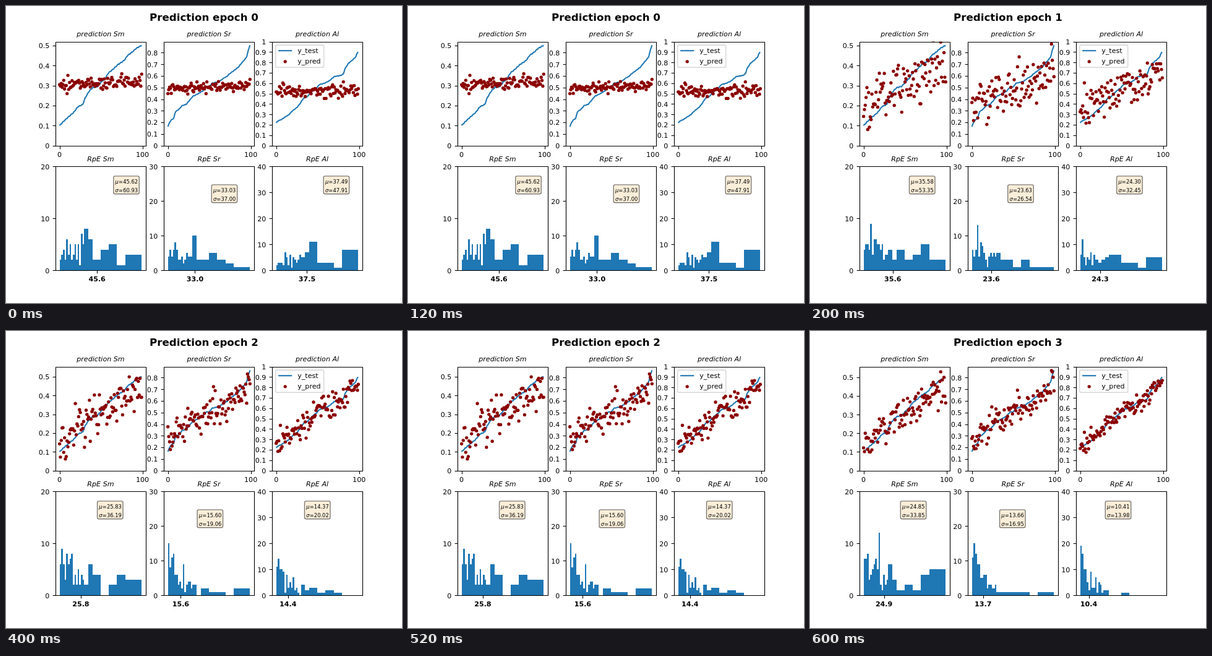
Animation of 640x480 px, one loop 0.8 s. Source, as an HTML page with a canvas:

```html
<!DOCTYPE html>
<html lang="en">
<head>
<meta charset="utf-8">
<title>Prediction epochs</title>
<style>
  html, body { margin: 0; width: 100%; height: 100%; overflow: hidden; background: #fff; }
  canvas { display: block; }
</style>
</head>
<body>
<canvas id="stage" width="640" height="480"></canvas>
<script>
const ctx = document.getElementById('stage').getContext('2d');
const PT = 100 / 72;
const BLUE = '#1f77b4', DARK_RED = '#8b0000';
const STEP = 200, EPOCHS = 4, COUNT = 100;
const AX_W = 145.88, AX_H = 168, COL = 175.06, LEFT = 80;
const TOP_Y = 57.6, LOW_Y = 259.2, PAD = AX_W / 22, SPAN = AX_W - 2 * PAD;

// Histogram bin edges in percent: fine at first, then coarser.
const EDGES = [...Array(16).keys()].map(i => i * 2).concat(35, 40, 50, 60, 70, 80, 100);

const panels = [
  {
    name: 'Sm', seed: 11, mid: 0.315, yMax: [0.52, 0.52, 0.554, 0.558], lowMax: 20, noteY: 15,
    slope: [0.03, 0.48, 0.68, 0.74], sd: [0.017, 0.066, 0.052, 0.046],
    mu: [45.62, 35.58, 25.83, 24.85], sigma: [60.93, 53.35, 36.19, 33.85],
    curve: [[0, .1], [4, .118], [10, .141], [17, .166], [22, .194], [28, .206], [31, .24], [36, .274],
      [40, .29], [46, .296], [51, .321], [55, .336], [59, .364], [64, .38], [70, .404], [77, .423],
      [79, .432], [82, .451], [88, .469], [92, .485], [99, .502]],
    bars: [
      [2, 3, 4, 2, 6, 3, 5, 2, 3, 5, 2, 5, 1, 7, 5, 8, 6, 2, 4, 5, 1, 3],
      [4, 5, 5, 4, 9, 3, 6, 6, 5, 5, 4, 5, 2, 3, 3, 4, 2, 4, 2, 3, 5, 2],
      [6, 9, 6, 3, 8, 6, 7, 8, 2, 4, 2, 5, 2, 4, 3, 2, 6, 4, 0, 2, 4, 3],
      [7, 7, 8, 3, 4, 5, 6, 7, 5, 12, 2, 1, 4, 2, 3, 6, 3, 1, 2, 1, 4, 5]
    ]
  },
  {
    name: 'Sr', seed: 29, mid: 0.505, yMax: [0.895, 0.895, 0.895, 0.895], lowMax: 30, noteY: 20,
    slope: [0.05, 0.5, 0.78, 0.82], sd: [0.022, 0.088, 0.066, 0.06],
    mu: [33.03, 23.63, 15.60, 13.66], sigma: [37.00, 26.54, 19.06, 16.95],
    curve: [[0, .163], [2, .2], [4, .22], [7, .235], [9, .29], [14, .317], [17, .344], [22, .355],
      [27, .397], [30, .424], [36, .445], [42, .47], [46, .504], [50, .506], [53, .536], [62, .552],
      [68, .584], [71, .594], [74, .616], [80, .648], [85, .675], [89, .712], [93, .744], [95, .765],
      [97, .82], [99, .866]],
    bars: [
      [4, 6, 4, 6, 8, 6, 3, 3, 4, 2, 3, 5, 4, 4, 4, 10, 3, 3, 5, 3, 2, 1],
      [6, 4, 6, 13, 4, 8, 7, 5, 3, 1, 4, 5, 4, 5, 4, 5, 3, 3, 1, 3, 1, 1],
      [15, 8, 11, 12, 6, 6, 3, 4, 2, 9, 1, 3, 4, 4, 2, 3, 0, 2, 1, 1, 0, 2],
      [11, 15, 12, 9, 9, 5, 5, 6, 6, 2, 3, 3, 2, 2, 3, 1, 1, 1, 1, 1, 0, 1]
    ]
  },
  {
    name: 'Al', seed: 47, mid: 0.525, yMax: [1, 1, 1, 1], lowMax: 40, noteY: 30,
    slope: [0.03, 0.55, 0.85, 0.93], sd: [0.03, 0.1, 0.068, 0.05],
    mu: [37.49, 24.30, 14.37, 10.41], sigma: [47.91, 32.45, 20.02, 13.98],
    curve: [[0, .218], [2, .236], [7, .254], [11, .277], [15, .295], [19, .33], [25, .367], [28, .396],
      [31, .432], [33, .456], [37, .468], [41, .504], [45, .533], [49, .557], [52, .587], [58, .599],
      [64, .623], [70, .664], [78, .675], [81, .69], [83, .74], [87, .79], [93, .83], [96, .855],
      [98, .896], [99, .9]],
    bars: [
      [2, 3, 3, 3, 2, 7, 5, 2, 6, 1, 5, 4, 3, 4, 6, 5, 7, 11, 3, 3, 1, 8],
      [6, 12, 5, 2, 5, 4, 7, 2, 6, 4, 4, 3, 3, 4, 4, 5, 6, 6, 3, 3, 1, 5],
      [11, 14, 10, 10, 9, 1, 8, 3, 5, 3, 7, 2, 3, 1, 0, 4, 2, 3, 1, 2, 1, 0],
      [19, 16, 10, 10, 5, 2, 9, 3, 3, 7, 1, 5, 4, 1, 2, 2, 0, 0, 1, 0, 0, 0]
    ]
  }
];

function seeded(seed) {
  let s = seed * 7919;
  return () => (s = (s * 16807) % 2147483647) / 2147483647;
}

// Linear interpolation with a faint stair, as in sorted samples.
function sample(curve, i) {
  let k = 1;
  while (curve[k][0] < i) k++;
  const [x0, y0] = curve[k - 1], [x1, y1] = curve[k];
  return y0 + (y1 - y0) * (i - x0) / (x1 - x0) + 0.002 * Math.sin(i * 1.9);
}

function prepare(p) {
  const rnd = seeded(p.seed);
  const bell = () => (rnd() + rnd() + rnd() + rnd() - 2) * 1.73;
  const indices = [...Array(COUNT).keys()];
  p.test = indices.map(i => sample(p.curve, i));
  const shared = indices.map(bell);
  p.pred = p.slope.map((slope, e) => p.test.map((y, i) => {
    const noise = e ? 0.87 * shared[i] + 0.5 * bell() : bell();
    return p.mid + slope * (y - p.mid) + p.sd[e] * noise;
  }));
}
panels.forEach(prepare);

const snap = v => Math.floor(v + 0.5) + 0.5;

function text(str, x, y, { size = 8, style = '', align = 'center' } = {}) {
  ctx.font = `${style} ${size * PT}px "DejaVu Sans", sans-serif`;
  ctx.textAlign = align;
  ctx.fillStyle = '#000';
  ctx.fillText(str, x, y);
}

function path(points, color, width) {
  ctx.beginPath();
  points.forEach(([x, y]) => ctx.lineTo(x, y));
  ctx.strokeStyle = color;
  ctx.lineWidth = width;
  ctx.stroke();
}

function dot(x, y) {
  ctx.beginPath();
  ctx.arc(x, y, 2.65, 0, 7);
  ctx.fillStyle = DARK_RED;
  ctx.fill();
}

function roundBox(x, y, w, h, fill, edge) {
  ctx.beginPath();
  ctx.roundRect(x, y, w, h, 2.5);
  ctx.fillStyle = fill;
  ctx.fill();
  ctx.strokeStyle = edge;
  ctx.lineWidth = PT;
  ctx.stroke();
}

function frame(x, y, title) {
  const l = snap(x), t = snap(y);
  ctx.strokeStyle = '#000';
  ctx.lineWidth = 0.8 * PT;
  ctx.strokeRect(l, t, snap(x + AX_W) - l, snap(y + AX_H) - t);
  text(title, x + AX_W / 2, y - 8.4, { style: 'italic' });
}

function xTick(x, bottom, label, style) {
  const px = snap(x), py = snap(bottom);
  path([[px, py], [px, py + 4.86]], '#000', 0.8 * PT);
  text(label, x, bottom + 18.2, { style });
}

function yTick(left, y, label) {
  const px = snap(left), py = snap(y);
  path([[px, py], [px - 4.86, py]], '#000', 0.8 * PT);
  text(label, left - 9.7, y + 4.3, { align: 'right' });
}

function legend(x, y) {
  roundBox(x + 5.6, y + 5.6, 78, 36, 'rgba(255,255,255,0.8)', 'rgba(204,204,204,0.8)');
  path([[x + 10, y + 14.6], [x + 32.2, y + 14.6]], BLUE, 1.5 * PT);
  dot(x + 21.1, y + 32.2);
  text('y_test', x + 41.1, y + 18.5, { align: 'left' });
  text('y_pred', x + 41.1, y + 35.7, { align: 'left' });
}

function prediction(p, e, x) {
  const bottom = TOP_Y + AX_H, max = p.yMax[e];
  const px = i => x + PAD + SPAN * i / 99;
  const py = v => bottom - AX_H * v / max;
  ctx.save();
  ctx.beginPath();
  ctx.rect(x, TOP_Y, AX_W, AX_H);
  ctx.clip();
  path(p.test.map((v, i) => [px(i), py(v)]), BLUE, 1.5 * PT);
  p.pred[e].forEach((v, i) => dot(px(i), py(v)));
  ctx.restore();
  xTick(px(0), bottom, '0');
  xTick(px(100), bottom, '100');
  for (let n = 0; n / 10 <= max; n++) yTick(x, py(n / 10), String(n / 10));
  frame(x, TOP_Y, 'prediction ' + p.name);
  if (p.name === 'Al') legend(x, TOP_Y);
}

function note(p, e, x, y) {
  roundBox(x - 2.5, y - 26.3, 41.5, 28.8, 'rgba(245,222,179,0.5)', 'rgba(0,0,0,0.5)');
  [['μ', p.mu[e], -14.2], ['σ', p.sigma[e], -0.3]].forEach(([sign, value, dy]) => {
    text(sign, x + 0.3, y + dy, { size: 6, style: 'italic', align: 'left' });
    text('=', x + 5.7, y + dy, { size: 6, align: 'left' });
    text(value.toFixed(2), x + 36.7, y + dy, { size: 6, align: 'right' });
  });
}

function histogram(p, e, x) {
  const bottom = LOW_Y + AX_H;
  const px = v => x + PAD + SPAN * v / 100;
  const py = v => bottom - AX_H * v / p.lowMax;
  ctx.fillStyle = BLUE;
  p.bars[e].forEach((h, i) => {
    const l = Math.round(px(EDGES[i])), t = Math.round(py(h));
    ctx.fillRect(l, t, Math.round(px(EDGES[i + 1])) - l, Math.round(bottom) - t);
  });
  xTick(px(p.mu[e]), bottom, p.mu[e].toFixed(1), 'bold');
  for (let v = 0; v <= p.lowMax; v += 10) yTick(x, py(v), String(v));
  frame(x, LOW_Y, 'RpE ' + p.name);
  note(p, e, px(p.mu[e] + 22), py(p.noteY));
}

function draw() {
  const e = Math.floor(performance.now() / STEP) % EPOCHS;
  ctx.fillStyle = '#fff';
  ctx.fillRect(0, 0, 640, 480);
  ctx.lineJoin = 'round';
  text('Prediction epoch ' + e, 320, 24, { size: 12, style: 'bold' });
  panels.forEach((p, i) => {
    prediction(p, e, LEFT + i * COL);
    histogram(p, e, LEFT + i * COL);
  });
  requestAnimationFrame(draw);
}
draw();
</script>
</body>
</html>
```
